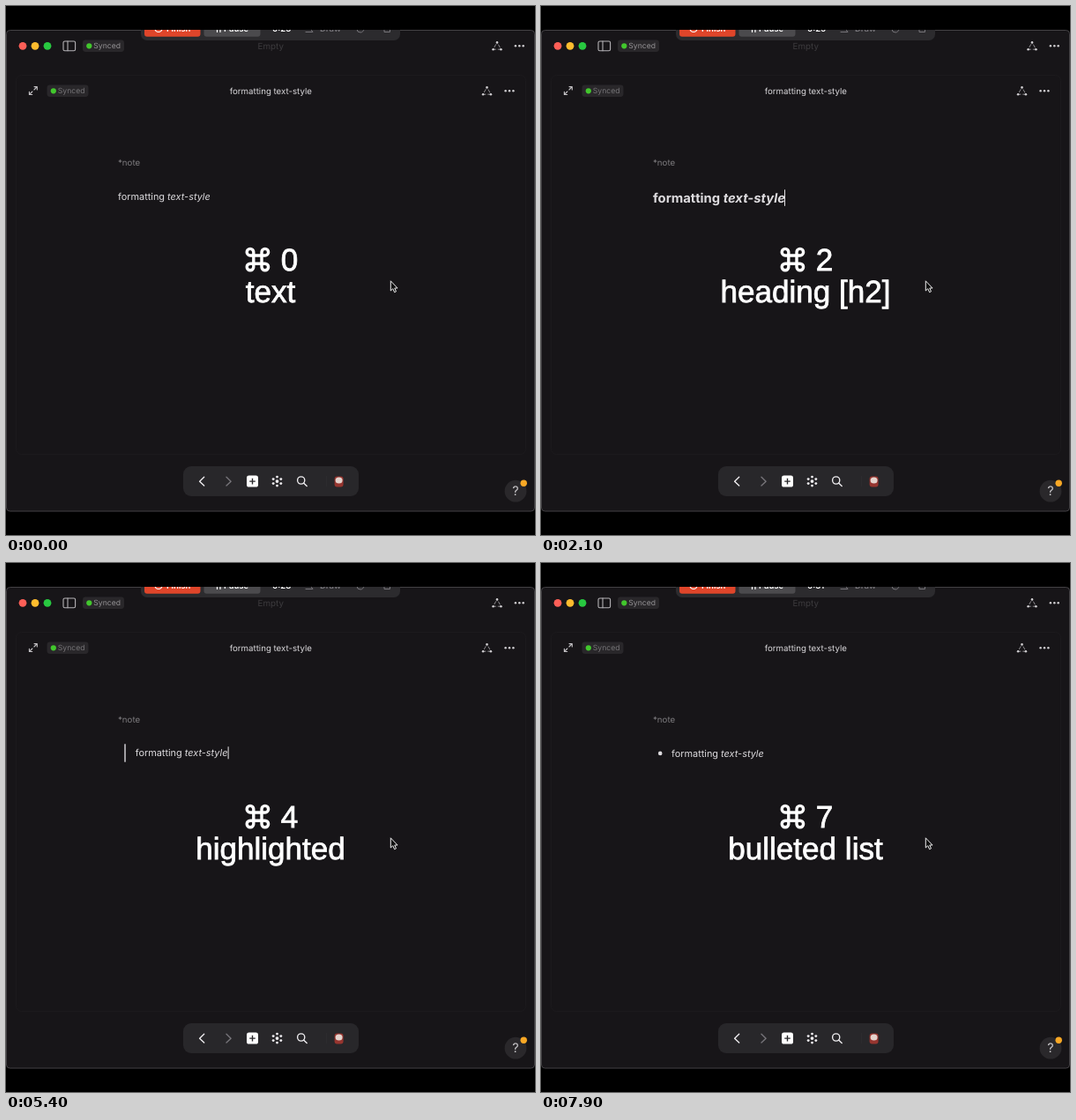
Recreate the animation shown at these times as an HTML page. Size 600 by 600 pixels, loop 8 s.

```html
<!DOCTYPE html>
<html lang="en">
<head>
<meta charset="utf-8">
<style>
  html, body { margin: 0; width: 100%; height: 100%; overflow: hidden; background: #000; }
  svg { display: block; width: 100vw; height: 100vh; }
  text { font-family: Inter, sans-serif; white-space: pre; text-rendering: geometricPrecision; }
  .mid { text-anchor: middle; }
  .caption { font: 35.1px "Liberation Sans", Arial, sans-serif; fill: #fff; stroke: #fff; stroke-width: .8; }
  .line { fill: none; stroke-linecap: round; stroke-linejoin: round; }
</style>
</head>
<body>
<svg viewBox="0 0 600 600">
  <defs>
    <clipPath id="screen"><rect y="27" width="600" height="546"/></clipPath>
    <g id="graph">
      <path class="line" d="M0-4.4-4.5 3.6H4.5Z" stroke="#aaa8ab" stroke-width=".8" stroke-dasharray="3.4 2.6" stroke-dashoffset="-2.8"/>
      <g fill="#d0ced1"><circle cy="-4.2" r="1.3"/><circle cx="-4.4" cy="3.6" r="1.3"/><circle cx="4.4" cy="3.6" r="1.3"/></g>
    </g>
    <g id="more" fill="#d0ced1"><circle cx="-4.4" r="1.25"/><circle r="1.25"/><circle cx="4.4" r="1.25"/></g>
    <g id="synced">
      <rect width="47" height="13.4" rx="3.4" fill="#29272a"/>
      <circle cx="7.3" cy="6.7" r="3.1" fill="#42c72d"/>
      <text x="12.3" y="9.8" font-size="8.6">Synced</text>
    </g>
  </defs>

  <rect width="600" height="600"/>
  <rect x=".5" y="27.5" width="599" height="545.5" rx="4" fill="#171518" stroke="#434144"/>
  <rect x="11.5" y="78.5" width="578" height="430" rx="6" fill="none" stroke="#1c1a1d"/>

  <!-- title bar -->
  <circle cx="19" cy="45.3" r="4.4" fill="#fe5f57"/>
  <circle cx="33" cy="45.3" r="4.4" fill="#febc2e"/>
  <circle cx="47" cy="45.3" r="4.4" fill="#28c840"/>
  <g class="line" stroke="#b5b3b6" stroke-width="1.1">
    <rect x="65" y="40" width="13.6" height="10.8" rx="1.6"/>
    <path d="M70 40v10.8"/>
  </g>
  <use href="#synced" x="87" y="38.6" fill="#939194"/>
  <text class="mid" x="300.3" y="49" font-size="9.8" fill="#3d3b3e">Empty</text>
  <use href="#graph" x="557" y="45.6"/>
  <use href="#more" x="582.3" y="45.3"/>

  <!-- recorder strip -->
  <g clip-path="url(#screen)" font-size="9.5" font-weight="600">
    <rect x="153" y="15" width="294" height="24" rx="7" fill="#2c2b2e"/>
    <rect x="157" y="15" width="63.5" height="19.8" rx="3" fill="#df452a"/>
    <rect x="224.5" y="15" width="64" height="19.8" rx="3" fill="#4b4a4d"/>
    <g class="line" stroke="#fff" stroke-width="1.2">
      <circle cx="173" cy="25.5" r="4"/>
      <path d="M239.5 22v7.4M243 22v7.4"/>
    </g>
    <g fill="#fff">
      <text x="182" y="29.2">Finish</text>
      <text x="247" y="29.2">Pause</text>
      <text x="302" y="29.2" id="clock"></text>
    </g>
    <g class="line" stroke="#77757a">
      <path d="M340 29.5h8l-3-4"/>
      <circle cx="402" cy="26" r="4"/>
      <path d="M429 22v7.5h6.5V22"/>
    </g>
    <text x="356" y="29.2" fill="#77757a">Draw</text>
  </g>

  <!-- note panel -->
  <g class="line" stroke="#c4c2c5" stroke-width="1.1">
    <path d="M31.9 95 35.3 91.6M32 91.6h3.3v3.3M29.9 97 26.4 100.5M26.4 97.2v3.3h3.3"/>
  </g>
  <use href="#synced" x="46.5" y="89.6" fill="#757376"/>
  <text class="mid" x="300.3" y="99.7" font-size="9.7" fill="#dad8db">formatting text-style</text>
  <use href="#graph" x="545.5" y="96.6"/>
  <use href="#more" x="571" y="96.3"/>
  <text x="127" y="180.6" font-size="9.7" fill="#7e7c7f">*note</text>

  <rect class="mark" data-kind="quote" x="134.3" y="205.3" width="1.4" height="20.4" fill="#dddbde"/>
  <circle class="mark" data-kind="check" cx="135" cy="215.8" r="6" fill="none" stroke="#9a989b" stroke-width="1.1"/>
  <circle class="mark" data-kind="bullet" cx="135.2" cy="215.9" r="2.3" fill="#dddbde"/>
  <text id="body" fill="#dddbde">formatting <tspan font-style="italic">text-style</tspan></text>
  <rect id="caret" y="208.3" width="1" fill="#e6e4e7"/>

  <!-- shortcut caption -->
  <path transform="translate(285.4 287.6)" fill="none" stroke="#fff" stroke-width="3.4"
    d="M-4.6-8.4A3.8 3.8 0 1 0-8.4-4.6H8.4A3.8 3.8 0 1 0 4.6-8.4V8.4A3.8 3.8 0 1 0 8.4 4.6H-8.4A3.8 3.8 0 1 0-4.6 8.4Z"/>
  <text class="caption" id="digit" x="311.8" y="300.3"></text>
  <text class="caption mid" id="label" x="300" y="335.7"></text>

  <path d="M436.3 311.8v11.2l2.5-2.3 1.8 4 1.9-.9-1.7-3.8h3.3Z" fill="#111" stroke="#eee" stroke-width="1" stroke-linejoin="round"/>

  <!-- dock -->
  <rect x="201" y="522" width="199" height="34" rx="9" fill="#28272a"/>
  <g class="line" stroke-width="1.35">
    <path d="M224.7 534.3 219.6 539.2 224.7 544.1" stroke="#f0eef1"/>
    <path d="M250 534.3 255.1 539.2 250 544.1" stroke="#77757a"/>
    <circle cx="334.7" cy="538" r="4.1" stroke="#f0eef1"/>
    <path d="M337.8 541.2 341.2 544.6" stroke="#f0eef1"/>
  </g>
  <rect x="273" y="532.6" width="13" height="13" rx="2.6" fill="#fff"/>
  <path d="M279.5 535.8v6.6M276.2 539.1h6.6" stroke="#28272a" stroke-width="1.4"/>
  <g id="flower" fill="#f0eef1" transform="translate(307.5 539.1)"><circle r="1.9"/></g>
  <path d="M363.5 533v12" stroke="#2d2c2f"/>
  <rect x="372.6" y="533.4" width="10" height="12.2" rx="3" fill="#96352f"/>
  <ellipse cx="377.6" cy="538" rx="4" ry="3.6" fill="#e4d3cd"/>

  <circle cx="578" cy="550.2" r="12.4" fill="#2a282b"/>
  <text class="mid" x="578" y="555.2" font-size="14.5" fill="#c9c7ca">?</text>
  <circle cx="587.2" cy="541.2" r="3.7" fill="#f9a825"/>
</svg>
<script>
  const LOOP = 8000;
  const $ = id => document.getElementById(id);
  const plain = { x: 127, y: 219.6, size: 10.9, weight: 400, caretX: 232, caretH: 14 };
  const bold = { ...plain, weight: 700 };
  const indented = { ...plain, x: 148, caretX: 252.7 };

  const styles = [
    { at: 0, digit: 0, label: 'text', ...plain },
    { at: 600, digit: 1, label: 'title [h1]', ...bold, y: 227.5, size: 18.8, caretX: 317.3, caretH: 24.5 },
    { at: 2100, digit: 2, label: 'heading [h2]', ...bold, y: 222.8, size: 14.8, caretX: 276, caretH: 18.5 },
    { at: 3300, digit: 3, label: 'subheading [h3]', ...bold, y: 220.2, size: 12.2, caretX: 250.5, caretH: 15.5 },
    { at: 5400, digit: 4, label: 'highlighted', ...indented, x: 146.7, y: 219.1, caretX: 251.6, mark: 'quote' },
    { at: 6400, digit: 6, label: 'checkbox', ...indented, mark: 'check' },
    { at: 7600, digit: 7, label: 'bulleted list', ...indented, mark: 'bullet' },
  ];
  // The caret starts hidden and flips at each of these times.
  const blinks = [300, 900, 1200, 1500, 2000, 2400, 2700, 3000, 3300, 3600, 4000, 4300, 4900, 5200,
    5400, 6000, 6400, 6700, 7000, 7300, 7600, 7900];

  for (let i = 0; i < 6; i++) {
    const dot = $('flower').firstElementChild.cloneNode();
    const angle = (i + .5) * Math.PI / 3;
    set(dot, { cx: 5 * Math.cos(angle), cy: 5 * Math.sin(angle), r: 1.45 });
    $('flower').append(dot);
  }

  function set(el, attrs) {
    for (const name in attrs) el.setAttribute(name, attrs[name]);
  }

  function setStyle(s) {
    $('digit').textContent = s.digit;
    $('label').textContent = s.label;
    set($('body'), { x: s.x, y: s.y, 'font-size': s.size, 'font-weight': s.weight });
    set($('caret'), { x: s.caretX, height: s.caretH });
    for (const el of document.querySelectorAll('.mark'))
      el.style.display = el.dataset.kind === s.mark ? '' : 'none';
  }

  let current;
  function draw(now) {
    const t = now % LOOP;
    const style = styles.findLast(s => s.at <= t);
    if (style !== current) setStyle(current = style);
    const flips = blinks.filter(b => b <= t).length;
    $('caret').style.display = flips % 2 ? '' : 'none';
    $('clock').textContent = '0:' + Math.floor(23.2 + t / 1000);
  }

  const start = performance.now();
  function tick() {
    draw(Math.max(0, performance.now() - start));
    requestAnimationFrame(tick);
  }
  tick();
</script>
</body>
</html>
```
